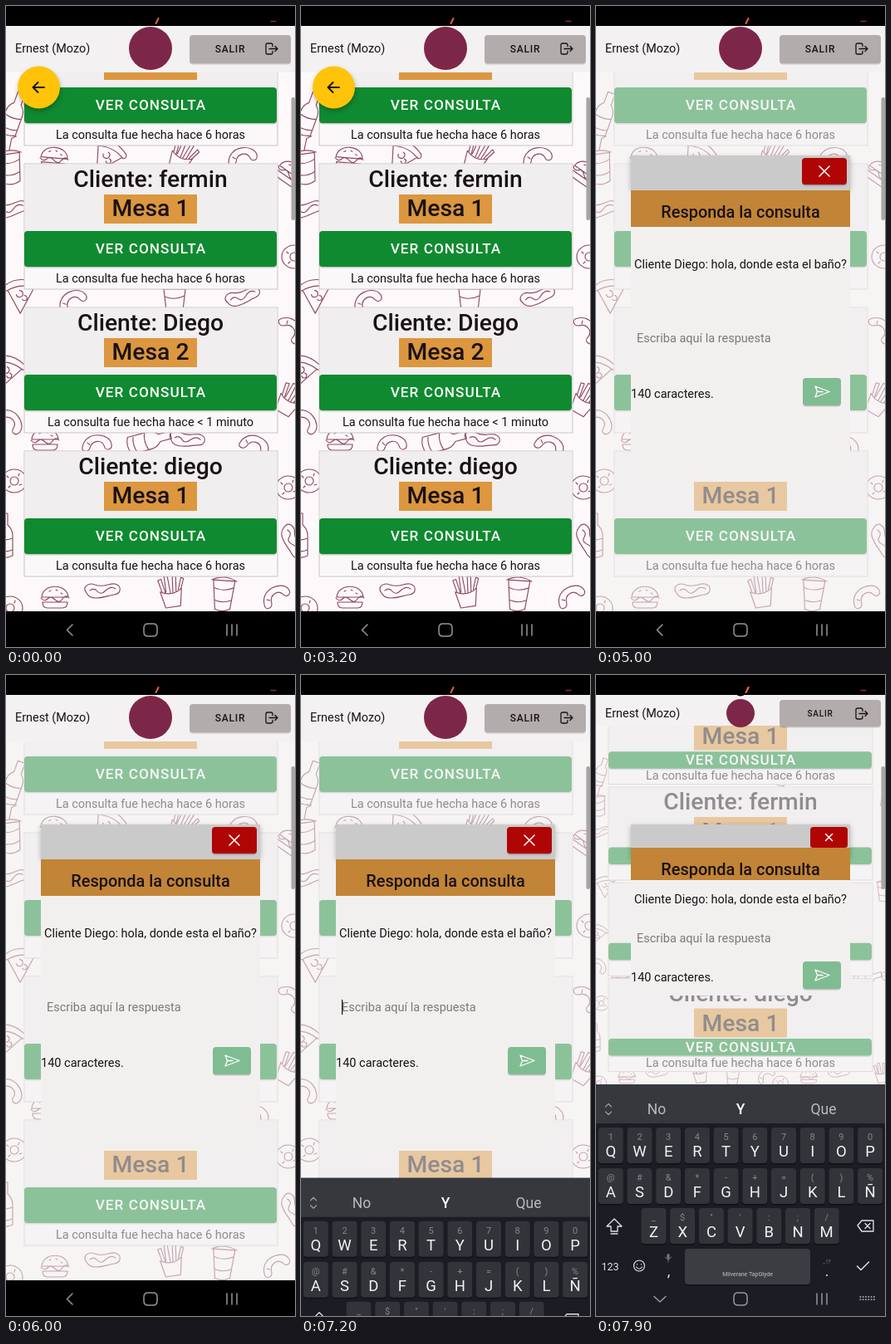
Write an HTML page that moves like this. It is 348 px wide and 772 px high and loops after 8000 ms.

```html
<!DOCTYPE html>
<html lang="es">
<head>
<meta charset="utf-8">
<title>Consultas</title>
<style>
html, body { margin: 0; width: 100%; height: 100%; overflow: hidden; background: #000; }
svg { display: block; width: 100%; height: 100%; font-family: Roboto, "Noto Sans", sans-serif; }
.m { text-anchor: middle; }
.b { font-weight: 500; }
.line { fill: none; stroke-linecap: round; stroke-linejoin: round; }
</style>
</head>
<body>
<svg id="stage" viewBox="0 0 348 772"></svg>
<script>
const LOOP = 8000, OPEN = 5000, FOCUS = 7100, RESIZE = 7230, BLINK = 500;
const BODY = 14.5, INK = '#1a1216';

const rect = (x, y, w, h, fill, r = 0, extra = '') =>
  `<rect x="${x}" y="${y}" width="${w}" height="${h}" rx="${r}" fill="${fill}" ${extra}/>`;
const text = (x, y, s, size, cls = '', fill = INK, extra = '') =>
  `<text x="${x}" y="${y}" font-size="${size}" class="${cls}" fill="${fill}" ${extra}>${s}</text>`;
const line = (d, color, w = 1.5, extra = '') =>
  `<path class="line" d="${d}" stroke="${color}" stroke-width="${w}" ${extra}/>`;
const group = (id, body, extra = '') => `<g id="${id}" ${extra}>${body}</g>`;

// Food doodles, each drawn around its own centre
const doodles = {
  burger: 'M-16 -1C-15 -18 15 -18 16 -1ZM-17 0Q-13 5 -9 1T0 2T9 1T17 0M-15 5H15Q15 12 9 12H-9Q-15 12 -15 5M-7 -8l2 -1M1 -10l2 1M7 -6l2 1',
  hotdog: 'M-19 3C-25 -5 -16 -10 -9 -7C2 -3 8 -9 15 -8C24 -6 23 4 14 5C6 6 2 9 -8 9Q-16 9 -19 3M-15 0Q-10 -4 -6 1T4 0T16 -2',
  cup: 'M-13 -12L-9 23Q0 27 9 22L13 -12ZM-15 -12Q0 -20 15 -12M-12 -3Q0 2 12 -4M-10 12Q0 16 10 11M1 -16L6 -30L12 -32',
  fries: 'M-12 -3L-8 17H10L14 -4Q1 5 -12 -3M-10 -3L-13 -17L-9 -18L-6 -1M-5 -2L-5 -21L-1 -21L0 0M3 0L5 -20L9 -19L7 -1M10 -3L15 -17L18 -15L13 -3',
  pizza: 'M-20 -12Q-2 -22 18 -8Q21 -3 16 -2Q0 -12 -18 -6Q-23 -8 -20 -12M-17 -6L-8 24L15 -3M-8 1a4 4 0 1 0 5 -4M-2 8a3 3 0 1 0 3 -4',
  ring: 'M-15 0a15 14 0 1 0 30 0a15 14 0 1 0 -30 0M-5 0a5 5 0 1 0 10 0a5 5 0 1 0 -10 0M-9 -6l2 2M6 -9l-1 3M9 4l-3 1M-7 8l2 -2',
  curl: 'M-17 8C-17 -14 13 -15 17 -2C19 5 11 7 9 2C5 -6 -7 -4 -8 7C-9 13 -17 13 -17 8M-12 1l3 2',
  bottle: 'M-4 -27H5V-13Q11 -8 11 0V24Q0 29 -10 24V0Q-10 -8 -4 -13ZM-10 3Q0 7 11 3M-10 17Q0 21 11 17'
};
const spots = [
  ['cup', 5, 190, -8], ['hotdog', 5, 245, -10], ['bottle', 9, 130, 20], ['pizza', 20, 345, -12],
  ['pizza', 4, 438, 8], ['curl', 6, 500, 60], ['ring', 10, 572, 0], ['bottle', -3, 638, 0],
  ['burger', 59, 713, 0], ['hotdog', 116, 704, 0], ['fries', 198, 707, -8], ['cup', 262, 704, 4],
  ['curl', 325, 710, -20], ['ring', 5, 725, 0], ['burger', 47, 523, 0], ['curl', 110, 527, 10],
  ['bottle', 172, 523, 75], ['hotdog', 218, 522, 8], ['curl', 300, 528, 30], ['cup', 203, 353, 0],
  ['curl', 80, 354, -15], ['hotdog', 285, 350, -15], ['pizza', 125, 180, 20], ['burger', 58, 184, 5],
  ['fries', 210, 182, 25], ['curl', 285, 181, 0], ['burger', 342, 202, 35], ['fries', 340, 475, 30],
  ['ring', 347, 302, 0], ['curl', 344, 390, 70], ['ring', 340, 580, 0], ['hotdog', 344, 645, 70]
];
const wallpaper = spots.map(([kind, x, y, a]) =>
  line(doodles[kind], '#8f4960', 1.15, `transform="translate(${x} ${y}) rotate(${a})"`)).join('');

// Two layouts: full height, and squeezed above the keyboard
const full = {
  left: 22, width: 305, top: 17, pitch: 173, height: 151, head: 28, box: 37, mesa: 63,
  btn: 81, btnH: 43, label: 108, cap: 143,
  bar: 80, name: 56, logo: [51, 26], exit: [35, 34], exitText: [270, 55.5, 12], exitIcon: 51.5,
  modal: 573, band: [222, 44], close: [248, 183, 54, 32, 6], title: 255, ask: 316, hint: 405, count: 472, send: 448
};
const tight = {
  left: 15, width: 318, top: 19.7, pitch: 115.3, height: 112, head: 27, box: 36, mesa: 63,
  btn: 72.5, btnH: 20.5, label: 88.5, cap: 106.5,
  bar: 61, name: 51, logo: [46, 17], exit: [30, 32], exitText: [270, 49.5, 10], exitIcon: 46.5,
  modal: 386, band: [208, 39], close: [258, 183, 45, 25, 4], title: 241, ask: 275, hint: 322, count: 369, send: 345
};
const clients = [
  ['Cliente: fermin', 1, '6 horas'], ['Cliente: fermin', 1, '6 horas'],
  ['Cliente: Diego', 2, '&lt; 1 minuto'], ['Cliente: diego', 1, '6 horas']
];

function card(L, [who, table, ago], i) {
  const y = L.top + i * L.pitch;
  return rect(L.left, y, L.width, L.height, '#faf8f8', 0, 'stroke="#c9c4c5"')
    + rect(L.left + .5, y + .5, L.width - 1, L.btn, '#f0eeee')
    + text(174, y + L.head, who, 28.3, 'm b')
    + rect(118, y + L.box, 112, 35, '#dc973f')
    + text(174, y + L.mesa, 'Mesa ' + table, 28.3, 'm b')
    + rect(L.left, y + L.btn + 1.5, L.width - 1, L.btnH, '#000', 4, 'opacity=".2"')
    + rect(L.left, y + L.btn, L.width - 1, L.btnH, '#108a30', 4)
    + text(174.5, y + L.label, 'VER CONSULTA', 17.2, 'm b', '#fff', 'letter-spacing="1.03"')
    + text(174, y + L.cap, 'La consulta fue hecha hace ' + ago, BODY, 'm');
}

function page(L) {
  const small = L === tight;
  const art = small
    ? `<g transform="translate(0 35) scale(.63)">${wallpaper}</g><g transform="translate(219 35) scale(.63)">${wallpaper}</g>`
    : wallpaper;
  return rect(0, 24, 348, 706, '#fdf9fa') + art + clients.map((c, i) => card(L, c, i)).join('');
}

function header(L) {
  const [by, bh] = L.exit, [tx, ty, ts] = L.exitText, y = L.exitIcon;
  return rect(0, 0, 348, 24, '#000')
    + rect(0, 24, 348, L.bar - 24, '#f4f1f2')
    + line('M180.5 21L183.5 15', '#e8603c', 2) + line('M319 18.5H325', '#8c2f2b', 1.3)
    + (L === tight ? '<circle cx="174" cy="18" r="7.5" fill="#000"/>' + line('M180.5 21L183.5 15', '#e8603c', 2) : '')
    + text(11, L.name, 'Ernest (Mozo)', 14.4)
    + rect(221, by + 1.5, 122, bh, '#000', 4, 'opacity=".18"')
    + rect(221, by, 122, bh, '#b3acac', 4)
    + text(tx, ty, 'SALIR', ts, 'm b', INK, 'letter-spacing=".8"')
    + line(`M321 ${y - 3}V${y - 4.5}Q321 ${y - 6.5} 319 ${y - 6.5}H315Q313 ${y - 6.5} 313 ${y - 4.5}V${y + 4.5}Q313 ${y + 6.5} 315 ${y + 6.5}H319Q321 ${y + 6.5} 321 ${y + 4.5}V${y + 3}M317 ${y}H327M324 ${y - 3}L327 ${y}L324 ${y + 3}`, INK, 1.3)
    + `<circle cx="174" cy="${L.logo[0]}" r="${L.logo[1]}" fill="#7d2748"/>`
    + rect(343.5, 110, 4.5, 148, '#a8a5a5', 2);
}

function modal(L) {
  const [bandY, bandH] = L.band, [cx, cy, cw, ch, r] = L.close;
  const mx = cx + cw / 2, my = cy + ch / 2, s = L.send;
  return rect(0, 24, 348, 706, '#f2f0f0', 0, 'opacity=".55"')
    + rect(42, 182, 264, 40, '#000', 0, 'opacity=".25" filter="url(#soft)"')
    + rect(42, 180, 264, L.modal - 180, '#f2f0ef')
    + rect(42, 180, 264, bandY - 180, '#cbcaca')
    + rect(cx, cy + 1.5, cw, ch, '#000', 4, 'opacity=".25"')
    + rect(cx, cy, cw, ch, '#b00505', 4)
    + line(`M${mx - r} ${my - r}l${2 * r} ${2 * r}M${mx + r} ${my - r}l${-2 * r} ${2 * r}`, '#fff', 1.5)
    + rect(42, bandY, 264, bandH, '#c28437')
    + text(174, L.title, 'Responda la consulta', 19.9, 'm b')
    + text(174, L.ask, 'Cliente Diego: hola, donde esta el baño?', BODY, 'm')
    + text(49, L.hint, 'Escriba aquí la respuesta', BODY, '', '#7b7979')
    + text(42, L.count, '140 caracteres.', BODY)
    + rect(249, s + 1.5, 46, 33, '#000', 4, 'opacity=".2"')
    + rect(249, s, 46, 33, '#80bc91', 4)
    + line(`M264 ${s + 10}L281 ${s + 16.5}L264 ${s + 23}L266.500 ${s + 16.5}ZM266.500 ${s + 16.5}H273`, '#fff', 1.3)
    + rect(49, L.hint - 14, 1.2, 18, '#111', 0, 'class="caret"');
}

const backButton = '<circle cx="40" cy="101" r="25" opacity=".3" filter="url(#soft)"/>'
  + '<circle cx="39.500" cy="98" r="25.500" fill="#ffc409"/>'
  + line('M46 98H33M38.500 92L32.500 98L38.500 104', INK, 1.9);

const square = line('M171 744H177Q182 744 182 749V754Q182 759 177 759H171Q166 759 166 754V749Q166 744 171 744Z', '#94969a', 1.5);
const bars = line('M266 745V758M272 745V758M278 745V758', '#94969a', 1.5);
const navBar = rect(0, 729, 348, 43, '#000') + line('M80 745L73.500 751.500L80 758', '#94969a') + square + bars;

function keyRow(letters, hints, x, y) {
  return [...letters].map((ch, i) => {
    const cx = x + i * 34.7;
    return rect(cx - 15, y + 1.5, 30, 43, '#101117', 4) + rect(cx - 15, y, 30, 43, '#323439', 4)
      + text(cx, y + 15, hints[i], 11, 'm', '#85878b') + text(cx, y + 35, ch, 18.5, 'm', '#f2f2f3');
  }).join('');
}

function keyboard() {
  const white = '#e4e4e6', grey = '#9a9ca0';
  let dots = '';
  for (let i = 0; i < 12; i++) dots += rect(317.5 + i % 6 * 3.3, 748 + (i / 6 | 0) * 3.3, 1.8, 1.8, grey);
  return rect(0, 493, 348, 279, '#1b1c24') + rect(0, 493, 348, 47, '#36383d')
    + line('M11.500 520L15 516.500L18.500 520M11.500 526L15 529.500L18.500 526', grey, 1.2)
    + text(73, 529, 'No', 17.5, 'm', '#b9babd') + text(174, 529, 'Y', 17.5, 'm b', '#fff') + text(274, 529, 'Que', 17.5, 'm', '#b9babd')
    + keyRow('QWERTYUIOP', '1234567890', 17.8, 545)
    + keyRow('ASDFGHJKLÑ', ['@', '#', '&amp;', '*', '-', '+', '=', '(', ')', '%'], 17.8, 594)
    + keyRow('ZXCVBNM', '_$"\':;/', 69.5, 642)
    + line('M22 655L13 664H18V670H26V664H31ZM18 673H26', white, 1.3)
    + line('M315 663L320 657H334V670H320ZM324 660.500L330 666.500M330 660.500L324 666.500', white, 1.3)
    + text(17, 717, '123', 12.5, 'm', white)
    + '<circle cx="52" cy="711.500" r="6.500" fill="none" stroke="#e4e4e6" stroke-width="1.200"/>'
    + line('M49.500 709.500v.4M54.500 709.500v.4M48.500 713Q52 717.500 55.500 713', white, 1.2)
    + rect(85.5, 697, 3, 6, '#77797e', 1.5) + line('M83.500 701Q87 707 90.500 701M87 704V707', '#77797e', 1)
    + text(87.5, 724, ',', 18, 'm', white)
    + rect(107, 692.5, 151, 43, '#101117', 4) + rect(107, 691, 151, 43, '#3b3d43', 4)
    + text(182.5, 724, 'Milverane TapGlyde', 7, 'm', '#c2c3c6')
    + text(278, 709, ',.!?', 8, 'm', '#77797e') + text(278, 724, '.', 18, 'm', white)
    + line('M314.500 712L319 716.500L328.500 707', white, 1.5)
    + line('M70 748.500L77 755L84 748.500', grey) + square + bars + dots;
}

const stage = document.getElementById('stage');
stage.innerHTML = '<defs><filter id="soft" x="-20%" y="-50%" width="140%" height="200%"><feGaussianBlur stdDeviation="3"/></filter></defs>'
  + group('fullPage', page(full)) + group('tightPage', page(tight))
  + group('fullModal', modal(full)) + group('tightModal', modal(tight))
  + group('fullHeader', header(full)) + group('tightHeader', header(tight))
  + group('back', backButton) + navBar + group('keys', keyboard());

const el = id => document.getElementById(id);
const show = (node, on) => node.setAttribute('display', on ? 'inline' : 'none');
const parts = Object.fromEntries(['fullPage', 'tightPage', 'fullModal', 'tightModal',
  'fullHeader', 'tightHeader', 'back', 'keys'].map(id => [id, el(id)]));
const carets = document.querySelectorAll('.caret');

function draw(t) {
  const open = t >= OPEN, small = t >= RESIZE;
  show(parts.fullPage, !small);
  show(parts.tightPage, small);
  show(parts.fullHeader, !small);
  show(parts.tightHeader, small);
  show(parts.fullModal, open && !small);
  show(parts.tightModal, small);
  show(parts.back, !open);
  const caretOn = t >= FOCUS && Math.floor((t - FOCUS) / BLINK) % 2 === 0;
  carets.forEach(c => show(c, caretOn));
  const p = Math.min(1, Math.max(0, (t - 7150) / 140));
  show(parts.keys, p > 0);
  parts.keys.setAttribute('transform', `translate(0 ${279 * (1 - p) ** 2})`);
}

const start = performance.now();
function tick() {
  draw((performance.now() - start) % LOOP);
  requestAnimationFrame(tick);
}
tick();
</script>
</body>
</html>
```
